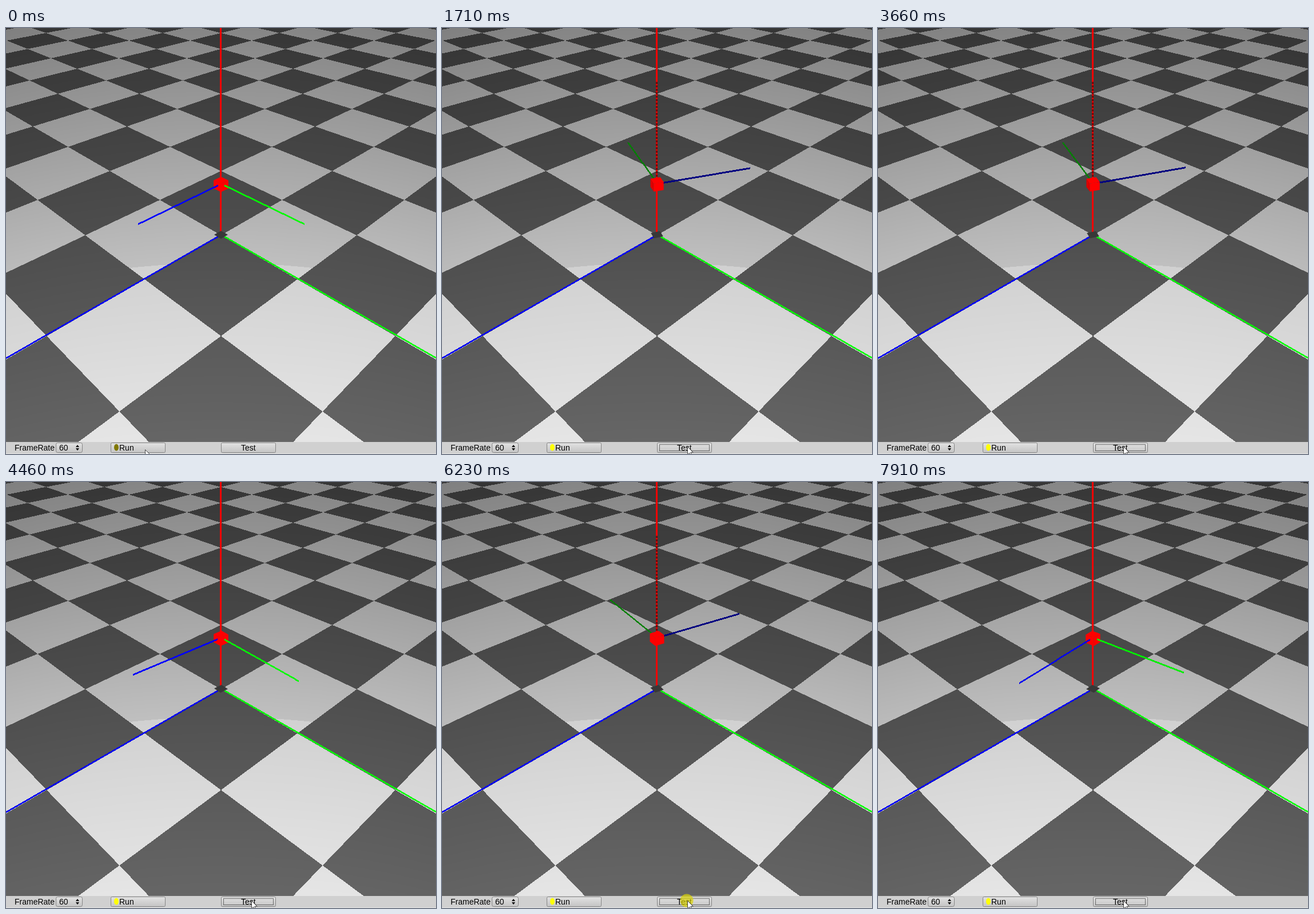
These frames come from a looping animation (752 px wide and 744 px high, 7.99 s). An HTML page with a canvas:

```html
<!DOCTYPE html>
<html lang="en">
<head>
<meta charset="utf-8">
<title>Spinning axes</title>
<style>
  html, body { margin: 0; width: 752px; height: 744px; overflow: hidden; background: #d0d0d0; }
  canvas, svg { position: absolute; left: 0; top: 0; display: block; }
  text { font: 14px "Liberation Sans", Arial, sans-serif; fill: #000; }
  .box { fill: url(#face); stroke: #858585; }
  .focus { fill: none; stroke: #000; stroke-dasharray: 1 1; }
</style>
</head>
<body>
<canvas id="view" width="752" height="723"></canvas>
<svg width="752" height="744" viewBox="0 0 752 744">
  <defs>
    <linearGradient id="face" x1="0" y1="0" x2="0" y2="1">
      <stop offset="0" stop-color="#e2e2e2"/>
      <stop offset="1" stop-color="#c4c4c4"/>
    </linearGradient>
  </defs>
  <rect y="723" width="752" height="21" fill="#d0d0d0"/>
  <rect y="743" width="752" height="1" fill="#e4e4e4"/>
  <text x="15" y="738">FrameRate</text>
  <rect class="box" x="87.5" y="724.5" width="46" height="17" rx="3"/>
  <text x="93" y="738">60</text>
  <path d="M122 732h6l-3-4zM122 734h6l-3 4z"/>
  <rect class="box" x="183.5" y="724.5" width="95" height="17" rx="2"/>
  <ellipse id="lamp" cx="193" cy="732.5" rx="4" ry="6"/>
  <text x="198" y="738">Run</text>
  <rect id="runFocus" class="focus" x="187.5" y="727.5" width="87" height="11"/>
  <rect class="box" x="376.5" y="724.5" width="95" height="17" rx="2"/>
  <text x="411" y="738">Test</text>
  <rect id="testFocus" class="focus" x="380.5" y="727.5" width="87" height="11"/>
  <g id="cursor">
    <circle id="press" cx="-1" r="11.5" fill="#dcd400" fill-opacity=".68"/>
    <path d="M.5 .5V14L3.600 11L6 16.500L8.200 15.500L5.800 10.200H10.200Z" fill="#fff" stroke="#333" stroke-width=".9"/>
  </g>
</svg>
<script>
const LOOP = 7990, W = 752, H = 723, CX = 376, HORIZON = -258, QUARTER = Math.PI / 2;
const $ = id => document.getElementById(id);
const ctx = $("view").getContext("2d");

// Each release of Test adds spin (ms, deg/s) that friction wears down
const FRICTION = 0.7, HOLD = 140, RUN_AT = 570;
const kicks = [[1317, 447], [4100, 464], [5955, 455], [6300, 455], [6791, 455]];
const releases = [RUN_AT, ...kicks.slice(1).map(k => k[0])];

const mix = (a, b, k) => a + (b - a) * Math.min(1, Math.max(0, k));

function heading(t) {
  let deg = 45;
  for (const [at, speed] of kicks)
    if (t > at) deg += speed / FRICTION * (1 - Math.exp(-FRICTION * (t - at) / 1000));
  return deg * Math.PI / 180;
}

// Checkerboard by casting each pixel back onto the ground, shaded by distance
function makeFloor() {
  const image = ctx.createImageData(W, H);
  for (let y = 0, i = 0; y < H; y++)
    for (let x = 0; x < W; x++, i += 4) {
      const dx = x + 0.5 - CX, w = 5600 / (y - HORIZON);
      const sum = 9.04 - w, diff = dx * w / 1073;
      const dark = (Math.floor((sum + diff) / 2) + Math.floor((sum - diff) / 2)) % 2 === 0;
      const depth = y - dx * dx / 3000;
      const level = dark ? 55 + depth * 0.065
        : depth > 410 ? 209 + (depth - 410) * 0.067
        : 134 + depth * 0.14;
      image.data.fill(level, i, i + 3);
      image.data[i + 3] = 255;
    }
  return image;
}
const floor = makeFloor();

function fillPoly(points, color) {
  ctx.fillStyle = color;
  ctx.beginPath();
  for (const [x, y] of points) ctx.lineTo(x, y);
  ctx.fill();
}

// Hard-edged line, three pixels across its longer direction
function line([x0, y0], [x1, y1], color) {
  const dx = x1 - x0, dy = y1 - y0, flat = Math.abs(dx) > Math.abs(dy);
  const steps = Math.round(Math.max(Math.abs(dx), Math.abs(dy)));
  ctx.fillStyle = color;
  for (let i = 0; i <= steps; i++) {
    const x = Math.round(x0 + dx * i / steps), y = Math.round(y0 + dy * i / steps);
    if (flat) ctx.fillRect(x, y - 1, 1, 3);
    else ctx.fillRect(x - 1, y, 3, 1);
  }
}

// Point at a distance and angle around the cube's centre; angle 0 faces the viewer
function around(dist, angle, lift = 0) {
  const w = 1 - 0.166 * dist * Math.cos(angle);
  return [CX + 181 * dist * Math.sin(angle) / w, HORIZON + 529.5 / w - 157 * lift];
}

function groundPoint(angle) {
  const w = 1 - 0.0112 * Math.cos(angle);
  return [CX + 12 * Math.sin(angle) / w, HORIZON + 619 / w];
}

const corners = (angle, point) => [0, 1, 2, 3].map(i => point(angle + (i + 0.5) * QUARTER));

function cube(angle) {
  const ring = lift => corners(angle, a => around(0.071, a, lift));
  const top = ring(0.035), bottom = ring(-0.055);
  top.forEach((p, i) => {
    const next = (i + 1) % 4, facing = Math.cos(angle + (i + 1) * QUARTER);
    if (facing > 0)
      fillPoly([p, top[next], bottom[next], bottom[i]], facing > 0.45 ? "#f00" : "#dc0000");
  });
  fillPoly(top, "#f00");
}

function drawScene(t) {
  const green = heading(t), blue = green - QUARTER;
  const lit = Math.cos(green) > 0.02 ? Math.cos(green) : 0;
  const level = 255 * Math.min(1, 0.5 + 0.7 * lit);

  ctx.putImageData(floor, 0, 0);
  line([CX, 360.5], [0, 576], "#0000f0");
  line([CX, 360.5], [W, 576], "#0f0");
  line([375, 0], [375, 358], "#f00");
  if (!lit) for (let y = 94; y < 262; y += 6) line([375, y], [375, y + 3], "#800000");
  fillPoly(corners(green, groundPoint), "#383838");

  const axes = [[blue, `rgb(0,0,${level})`], [green, `rgb(0,${level},0)`]];
  const near = ([angle]) => Math.cos(angle) > 0;
  const drawAxis = ([angle, color]) => line(around(0.05, angle), around(1, angle), color);
  axes.filter(a => !near(a)).forEach(drawAxis);
  cube(green);
  axes.filter(near).forEach(drawAxis);
}

function show(id, on) {
  $(id).setAttribute("visibility", on ? "visible" : "hidden");
}

function draw(t) {
  const testAt = kicks[0][0], travel = (t - 590) / 410;
  const x = mix(243, 429, travel);
  const y = mix(736, 734, (t - 150) / 140) - mix(0, 3, travel);
  drawScene(t);
  $("lamp").setAttribute("fill", t >= RUN_AT - HOLD / 2 ? "#ff0" : "#807800");
  show("runFocus", t >= RUN_AT - HOLD / 2 && t < testAt);
  show("testFocus", t >= testAt);
  show("press", releases.some(r => t >= r - HOLD && t < r));
  $("cursor").setAttribute("transform", `translate(${x} ${y})`);
}

function tick() {
  draw(performance.now() % LOOP);
  requestAnimationFrame(tick);
}
tick();
</script>
</body>
</html>
```
